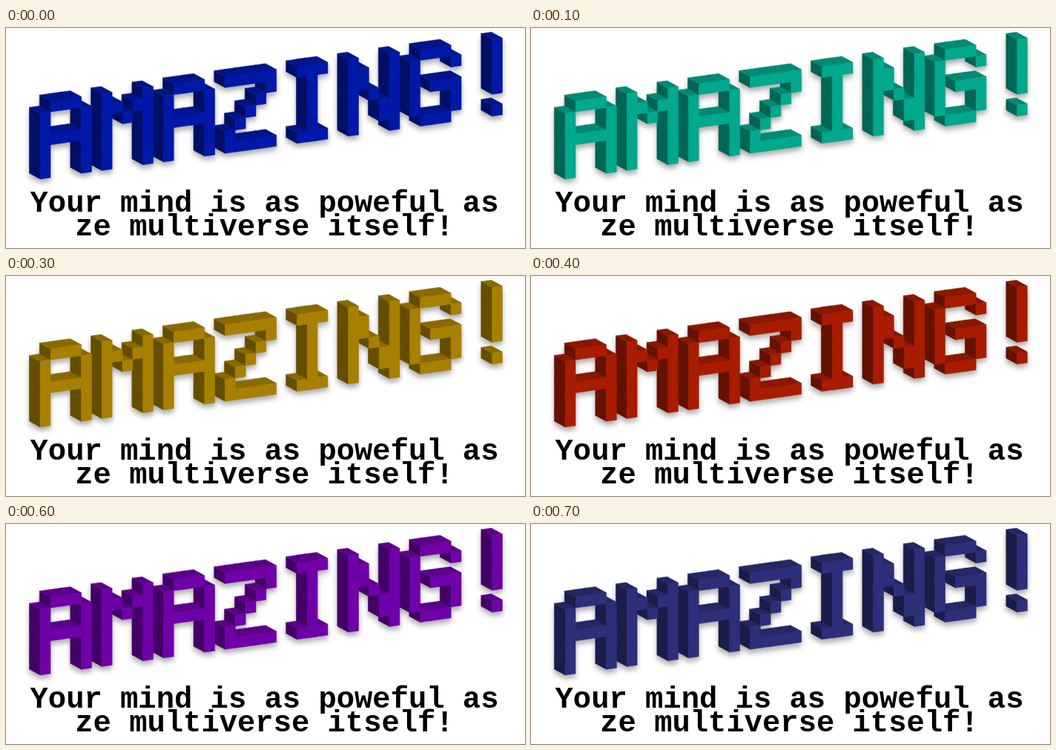
These frames come from a looping animation (700x297 px, 0.8 s). An HTML page:

```html
<!DOCTYPE html>
<html lang="en">
<head>
<meta charset="utf-8">
<style>
  html, body { margin: 0; width: 100%; height: 100%; overflow: hidden; background: #fff; }
  svg { display: block; width: 100%; height: 100%; }
  #word { filter: drop-shadow(0 5px 3.5px rgba(0, 0, 0, .32)); }
  path { fill: var(--shade); stroke: var(--shade); stroke-width: .5; stroke-linejoin: round; }
  .front { --shade: var(--color); }
  .top { --shade: color-mix(in srgb, var(--color), black 18%); }
  .left { --shade: color-mix(in srgb, var(--color), black 40%); }
  text { font: bold 40.5px "Liberation Mono", "Courier New", monospace; text-anchor: middle; }
</style>
</head>
<body>
<svg viewBox="0 0 700 297">
  <g id="word"></g>
  <text x="348.5" y="248">Your mind is as poweful as</text>
  <text x="348.5" y="280">ze multiverse itself!</text>
</svg>
<script>
// Pen strokes through (column, row) points of a 5 x 7 grid
const LETTERS = {
  A: ['06 01 10 30 41 46', '13 33'],
  M: ['06 00 22 40 46'],
  Z: ['00 40 41 05 06 46'],
  I: ['10 30', '20 26', '16 36'],
  N: ['06 00 11 12 34 35 46 40'],
  G: ['41 30 10 01 05 16 36 45 43 23'],
  '!': ['20 24', '26']
};
const COLORS = ['#0019a8', '#00a88c', '#5ca800', '#a88000', '#a81c00', '#a8006b', '#7000a8', '#2c2f7a'];
const STEP = 100;
const word = document.getElementById('word');

// All grid cells that a stroke passes through
function trace(stroke) {
  const points = stroke.split(' ').map(p => [...p].map(Number));
  let [x, y] = points[0];
  const cells = [[x, y]];
  for (const [endX, endY] of points)
    while (x !== endX || y !== endY) {
      x += Math.sign(endX - x);
      y += Math.sign(endY - y);
      cells.push([x, y]);
    }
  return cells;
}

// Grid corner to stage; depth 1 is the back plane
function project([col, row, depth]) {
  const x = 46.2 + col * 13.85 - depth * 14.8;
  const y = 100.4 - col * 1.93 + row * 14.8 - depth * 8;
  return x.toFixed(2) + ',' + y.toFixed(2);
}

const outline = corners => 'M' + corners.map(project).join('L') + 'Z';

function draw(kind, d) {
  const path = document.createElementNS('http://www.w3.org/2000/svg', 'path');
  path.setAttribute('class', kind);
  path.setAttribute('d', d);
  word.append(path);
}

const cells = [...'AMAZING!'].flatMap((letter, i) =>
  LETTERS[letter].flatMap(trace).map(([c, r]) => [c + i * 6, r]));

// Far cells lie to the right and below
cells.sort((a, b) => b[1] - a[1] || b[0] - a[0]);
for (const [c, r] of cells) {
  draw('left', outline([[c, r, 0], [c, r, 1], [c, r + 1, 1], [c, r + 1, 0]]));
  draw('top', outline([[c, r, 0], [c, r, 1], [c + 1, r, 1], [c + 1, r, 0]]));
}
draw('front', cells.map(([c, r]) =>
  outline([[c, r, 0], [c + 1, r, 0], [c + 1, r + 1, 0], [c, r + 1, 0]])).join(''));

function paint(now) {
  word.style.setProperty('--color', COLORS[Math.floor(now / STEP) % COLORS.length]);
  requestAnimationFrame(paint);
}
paint(performance.now());
</script>
</body>
</html>
```
